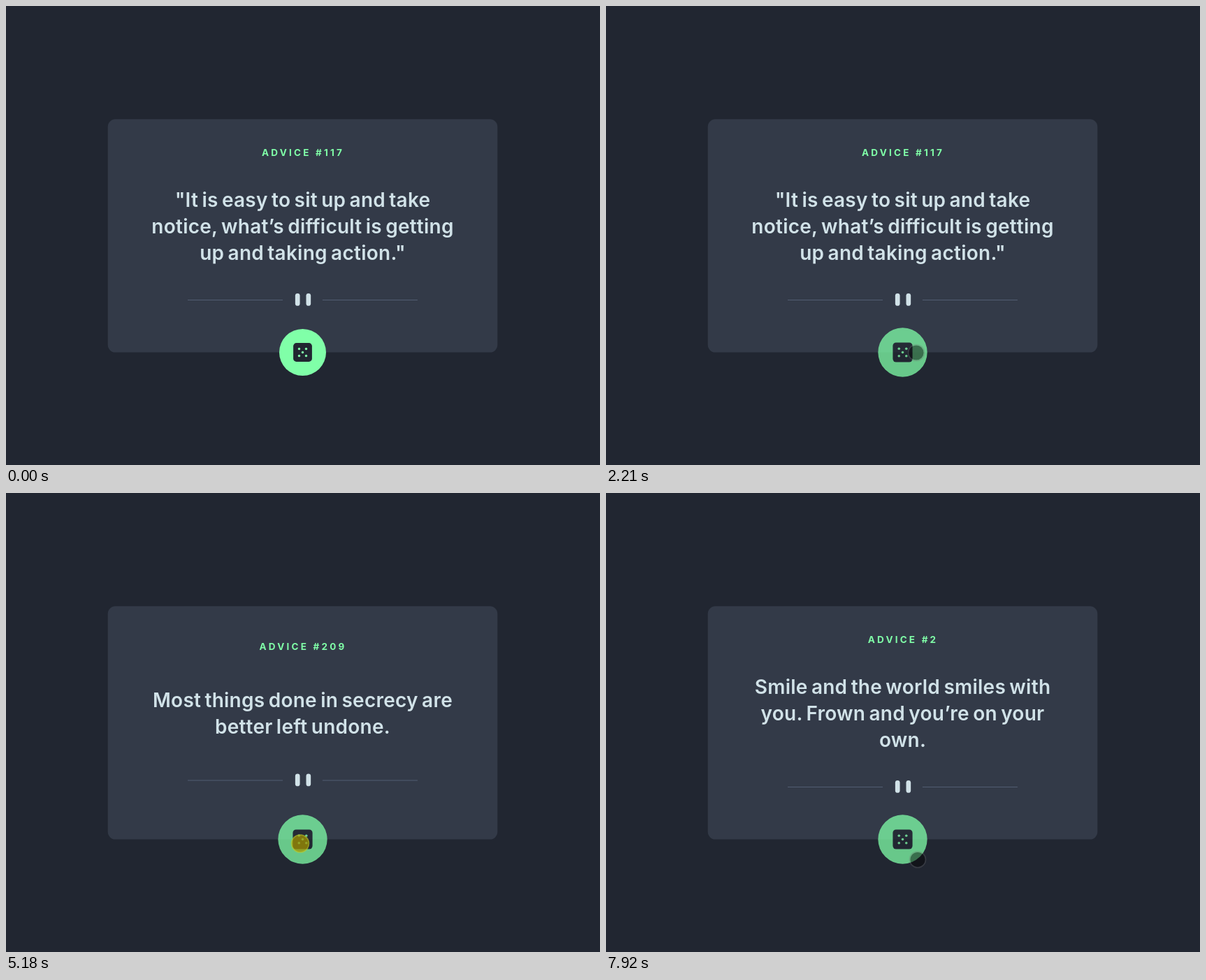
Recreate the animation shown at these times as an HTML page. Size 850 by 658 pixels, loop 7.99 s.

```html
<!DOCTYPE html>
<html lang="en">
<head>
<meta charset="utf-8">
<title>Advice generator</title>
<style>
  html, body { margin: 0; width: 100%; height: 100%; overflow: hidden; background: #212631; }
  svg { display: block; width: 850px; height: 658px; }
  text { font-family: Inter, "Open Sans", sans-serif; text-anchor: middle; font-optical-sizing: none; }
  .label { font-size: 13.5px; font-weight: 700; letter-spacing: 3.2px; fill: #80ffa8; }
  .quote { font-size: 28px; font-weight: 600; letter-spacing: 0.25px; word-spacing: -2px; fill: #d1e2e8; }
</style>
</head>
<body>
<svg viewBox="0 0 850 658">
  <rect width="850" height="658" fill="#212631"/>
  <rect x="145.7" y="162.2" width="557.6" height="334.4" rx="11" fill="#333a48"/>
  <g id="advice"></g>
  <g id="divider">
    <path d="M0 8h122v1H0zM173 8h122v1H173z" fill="#525d72"/>
    <g fill="#d1e2e8">
      <rect x="138" width="6" height="16" rx="3"/>
      <rect x="152" width="6" height="16" rx="3"/>
    </g>
  </g>
  <g id="button">
    <circle r="33.5" fill="#80ffa8"/>
    <rect x="-13.4" y="-13.4" width="26.8" height="26.8" rx="4.5" fill="#212631"/>
    <g id="pips" fill="#80ffa8"></g>
  </g>
  <g id="cursor">
    <circle id="disc"/>
    <circle id="ring" fill="none" stroke-width="1.6"/>
  </g>
</svg>
<script>
const LOOP = 7990;
const MID = 424.5;
const $ = id => document.getElementById(id);

const ADVICE = [
  { at: 0, id: 117, lines: ['"It is easy to sit up and take', 'notice, what’s difficult is getting', 'up and taking action."'] },
  { at: 2570, id: 209, lines: ['Most things done in secrecy are', 'better left undone.'] },
  { at: 5910, id: 2, lines: ['Smile and the world smiles with', 'you. Frown and you’re on your', 'own.'] }
];

const linear = p => p;
const easeOut = p => 1 - (1 - p) ** 2;
const easeBoth = p => p * p * (3 - 2 * p);

// Each row: time, values..., easing used on the way to it
const PATH = [
  [260, 678, 642],
  [1010, 466, 513.5, easeOut],
  [1080, 458, 508, linear],
  [1280, 439, 498, easeOut],
  [1480, 438, 497.5, linear],
  [2000, 438, 497.5, linear],
  [2210, 444, 497, linear],
  [2500, 502, 525, easeBoth],
  [2710, 518, 527.5, easeOut],
  [3560, 518, 527.5, linear],
  [3570, 516.5, 528, linear],
  [3910, 516.5, 528, linear],
  [4710, 427, 515, easeBoth],
  [4910, 421, 502.5, easeOut],
  [5450, 421, 502.5, linear],
  [6050, 500, 535.5, easeBoth],
  [7270, 500, 535.5, linear],
  [7920, 446, 525.5, easeBoth]
];

const SCALE = [
  [1880, 1],
  [2010, 1.2, easeOut],
  [2180, 1.05, easeBoth],
  [5420, 1.05, linear],
  [5550, 1.2, easeOut],
  [5720, 1.05, easeBoth]
];

const FADE = [[1880, 1], [2010, 0.75, linear]];
const PRESSES = [[1750, 1880], [5180, 5310]];

function sample(keys, t) {
  const next = keys.findIndex(k => k[0] > t);
  const values = k => k.filter(v => typeof v === 'number').slice(1);
  if (next === 0) return values(keys[0]);
  if (next < 0) return values(keys[keys.length - 1]);
  const a = keys[next - 1], b = keys[next];
  const p = b[b.length - 1]((t - a[0]) / (b[0] - a[0]));
  const from = values(a);
  return values(b).map((v, i) => from[i] + (v - from[i]) * p);
}

const textAt = (cls, x, y, s) => `<text class="${cls}" x="${x}" y="${y}">${s}</text>`;

let shown = null;
function showAdvice(item) {
  if (item === shown) return;
  shown = item;
  // Spare height is shared out evenly when a line is missing
  const spare = (3 - item.lines.length) * 9.5;
  $('advice').innerHTML = textAt('label', 425, 215 + spare, 'ADVICE #' + item.id) +
    item.lines.map((s, i) => textAt('quote', MID, 288 + spare * 2 + i * 38, s)).join('');
  $('divider').setAttribute('transform', `translate(260 ${412 - spare}) scale(1.115)`);
}

$('pips').innerHTML = [[0, 0], [-5, -5], [5, -5], [-5, 5], [5, 5]]
  .map(([x, y]) => `<circle cx="${x}" cy="${y}" r="1.7"/>`).join('');

function draw(t) {
  showAdvice(ADVICE.filter(a => a.at <= t).pop());

  const [scale] = sample(SCALE, t);
  $('button').setAttribute('transform', `translate(${MID} 496.5) scale(${scale})`);
  $('button').setAttribute('opacity', sample(FADE, t)[0]);

  const [x, y] = sample(PATH, t);
  const pressed = PRESSES.some(([from, to]) => t >= from && t < to);
  $('cursor').setAttribute('transform', `translate(${x} ${y})`);
  $('cursor').setAttribute('visibility', t < 260 ? 'hidden' : 'visible');
  $('disc').setAttribute('r', pressed ? 12.4 : 10.6);
  $('disc').setAttribute('fill', pressed ? 'rgba(165,150,0,.72)' : 'rgba(0,0,0,.45)');
  $('ring').setAttribute('r', pressed ? 12.5 : 11.5);
  $('ring').setAttribute('stroke', pressed ? 'rgba(190,205,40,.6)' : 'rgba(110,110,110,.3)');
}

const start = performance.now();
function tick() {
  draw((performance.now() - start) % LOOP);
  requestAnimationFrame(tick);
}
tick();
</script>
</body>
</html>
```
